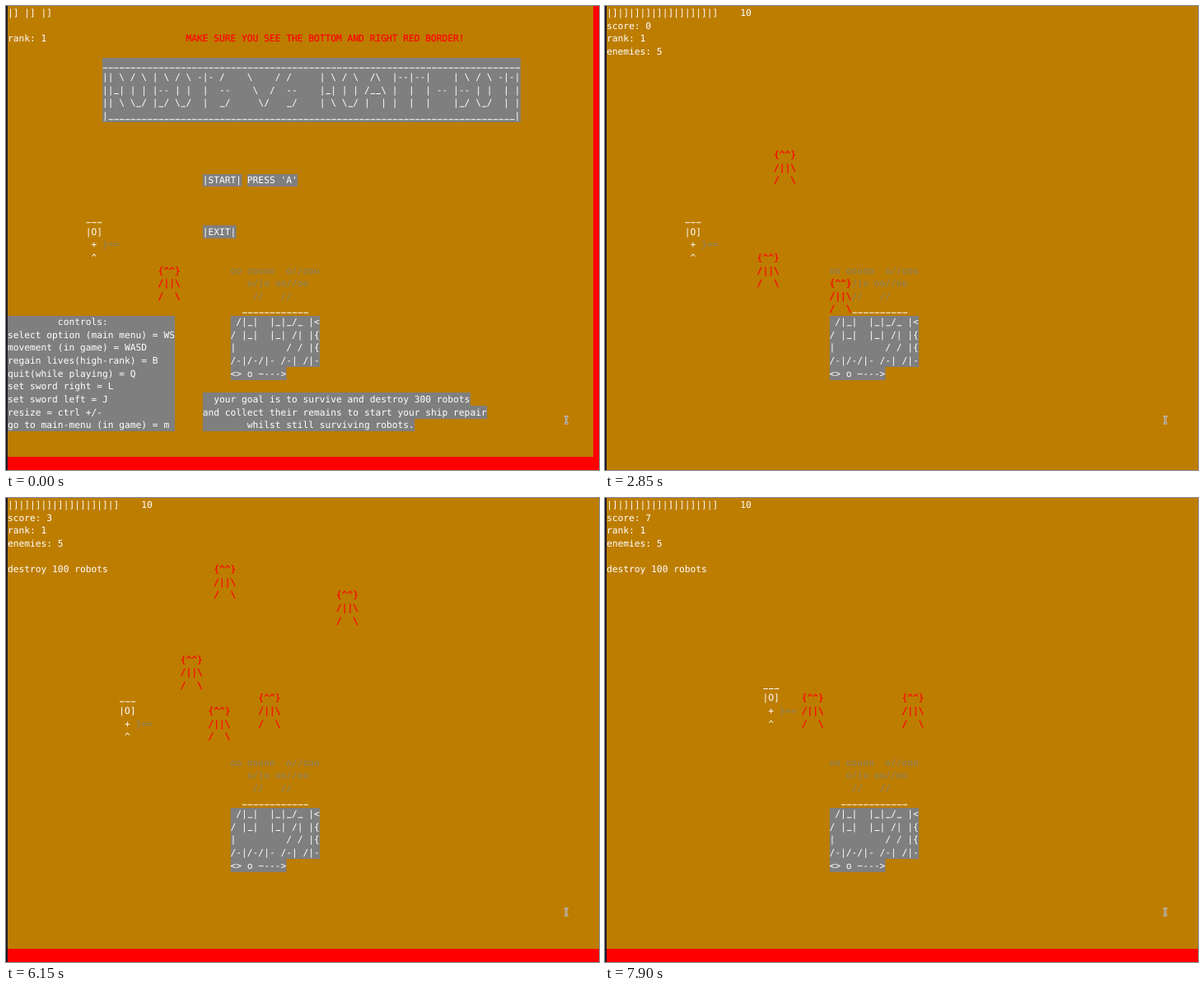
Animation, 720 px wide and 563 px high, one loop 8000 ms. Source, as an HTML page:

```html
<!DOCTYPE html>
<html lang="en">
<head>
<meta charset="utf-8">
<title>Terminal game</title>
<style>
  html, body { margin: 0; width: 100%; height: 100%; overflow: hidden; background: #bd7d00; }
  svg { display: block; width: 100%; height: 100%; }
  text {
    font: 11.245px "DejaVu Sans Mono", "Noto Sans Mono", monospace;
    font-variant-ligatures: none;
    text-rendering: geometricPrecision;
    white-space: pre;
  }
</style>
</head>
<body>
<svg id="stage" viewBox="0 0 720 563">
  <rect width="720" height="563" fill="#bd7d00"/>
  <rect width="2" height="563" fill="#1c1a26"/>
  <g id="panels" fill="#7f7f7f"></g>
  <g id="menuPanels" fill="#7f7f7f"></g>
  <rect id="right" x="713" width="7" height="563" fill="#f00"/>
  <rect id="bottom" x="2" y="547" width="718" height="16" fill="#f00"/>
  <g id="rows"></g>
  <g fill="none">
    <path d="M678 498h4.500M680.300 498v8.500M678 506.500h4.500" stroke="#d6d3cc" stroke-width="2.200"/>
    <path d="M678.500 498h3.500M680.300 498v8.500M678.500 506.500h3.500" stroke="#777" stroke-width=".7"/>
  </g>
</svg>
<script>
const NS = 'http://www.w3.org/2000/svg';
const COLS = 106, ROWS = 36, CW = 6.77, CH = 15.63;
const LOOP = 8000, GAME = 2600, MOVE = 4900, TURN = 1000 / 12;
const $ = id => document.getElementById(id);

function add(parent, tag, attrs) {
  const el = document.createElementNS(NS, tag);
  for (const k in attrs) el.setAttribute(k, attrs[k]);
  return parent.appendChild(el);
}

// Underscores are drawn as short dashes on the baseline.
const styles = {
  white: { fill: '#fff' },
  line: { stroke: '#fff' },
  red: { fill: '#f00', stroke: '#f00', 'stroke-width': 0.2 },
  dim: { fill: '#837f66' }
};
const layers = {};
for (const name in styles) {
  const g = add($('rows'), 'g', styles[name]);
  layers[name] = Array.from({ length: ROWS }, (_, r) => {
    const y = 12 + r * CH;
    return { y, el: add(g, name === 'line' ? 'path' : 'text', { x: 2, y }), cells: [], shown: '' };
  });
}

function put(col, row, lines, color = 'white') {
  [].concat(lines).forEach((line, i) => [...line].forEach((ch, j) => {
    for (const name in layers) layers[name][row + i].cells[col + j] = ' ';
    layers[ch === '_' ? 'line' : color][row + i].cells[col + j] = ch;
  }));
}

function panel(group, col, row, lines) {
  const w = Math.max(...lines.map(s => s.length));
  const edge = r => Math.round(0.5 + r * CH);
  add($(group), 'rect', {
    x: 2 + col * CW, y: edge(row), width: w * CW, height: edge(row + lines.length) - edge(row)
  });
}

const menu = [
  [17, 4, [
    '_'.repeat(75),
    '|| \\ / \\ | \\ / \\ -|- /    \\    / /     | \\ / \\  /\\  |--|--|    | \\ / \\ -|-|',
    '||_| | | |-- | |  |  --    \\  /  --    |_| | | /__\\ |  |  | -- |-- | |  | |',
    '|| \\ \\_/ |_/ \\_/  |  _/     \\/   _/    | \\ \\_/ |  | |  |  |    |_/ \\_/  | |',
    '|' + '_'.repeat(73) + '|'
  ]],
  [35, 13, ['|START|']],
  [43, 13, ["PRESS 'A'"]],
  [35, 17, ['|EXIT|']],
  [0, 24, [
    '         controls:',
    'select option (main menu) = WS',
    'movement (in game) = WASD',
    'regain lives(high-rank) = B',
    'quit(while playing) = Q',
    'set sword right = L',
    'set sword left = J',
    'resize = ctrl +/-',
    'go to main-menu (in game) = m'
  ]],
  [35, 30, ['  your goal is to survive and destroy 300 robots']],
  [35, 31, ['and collect their remains to start your ship repair']],
  [35, 32, ['        whilst still surviving robots.']]
];
const ship = [
  [40, 24, [
    ' /|_|  |_|_/_ |<',
    '/ |_|  |_| /| |{',
    '|         / / |{',
    '/-|/-/|- /-| /|-'
  ]],
  [40, 28, ['<> o ~--->']]
];
menu.forEach(m => panel('menuPanels', ...m));
ship.forEach(s => panel('panels', ...s));

const smoke = ['oo ooooo  o//ooo', '   o/|o oo//oo', '    //   //'];
const body = ['{^^}', '/||\\', '/  \\'];
const blank = Array(3).fill('    ');

// The hero zigzags between a few corners, given by turn.
const corners = [
  { turn: -1, x: 14, y: 16 }, { turn: 0, x: 14, y: 17 }, { turn: 1, x: 14, y: 17 },
  { turn: 10, x: 18, y: 14 }, { turn: 21, x: 22, y: 17 },
  { turn: 30, x: 26, y: 14 }, { turn: 36, x: 28, y: 14 }
];
const SLOW = 0.29, FAST = 0.47;
const robots = [
  { born: -4, x: 27, y: 20, speed: FAST },
  { born: -2, x: 30, y: 11, speed: SLOW },
  { born: -2, x: 40, y: 21, speed: SLOW },
  { born: 11, x: 46, y: 13, speed: FAST },
  { born: 11, x: 38, y: 3, speed: SLOW },
  { born: 11, x: 60, y: 5, speed: SLOW },
  { born: 11, x: 32, y: 10, speed: FAST },
  { born: 22, x: 38, y: 12, speed: FAST }
];
const repaints = [-4, 11, 25];

// Four turns at the start of the game, a pause, then steady play.
function turnAt(t) {
  const turns = from => Math.floor((t - from) / TURN + 1e-6);
  if (t < GAME) return -4;
  return t < MOVE ? Math.min(-1, turns(GAME) - 4) : turns(MOVE);
}

function heroAt(turn) {
  const i = corners.findIndex(c => c.turn >= turn);
  const b = corners[i < 0 ? corners.length - 1 : i], a = corners[Math.max(0, i - 1)];
  const k = i > 0 ? (turn - a.turn) / (b.turn - a.turn) : 1;
  return { x: Math.round(a.x + (b.x - a.x) * k), y: Math.round(a.y + (b.y - a.y) * k) };
}

// Robots drift left, match the hero's row every other turn and die on the sword.
function chase(robot, turn) {
  const trail = [];
  let y = robot.y;
  for (let n = robot.born; n <= turn; n++) {
    const hero = heroAt(n);
    const steps = Math.max(0, n - Math.max(0, robot.born));
    const x = robot.x - Math.floor(robot.speed * steps);
    if (x <= hero.x + 6) return { trail, dead: true };
    if (n > robot.born && n % 2 === 0) y += Math.sign(hero.y + 1 - y);
    trail.push({ n, x, y });
  }
  return { trail, dead: false };
}

function drawMenu() {
  put(0, 0, '|] |] |]');
  put(0, 2, 'rank: 1');
  put(32, 2, 'MAKE SURE YOU SEE THE BOTTOM AND RIGHT RED BORDER!', 'red');
  menu.forEach(m => put(...m));
}

function drawStatus(score) {
  put(0, 0, '|]'.repeat(10) + '    10');
  put(0, 1, ['score: ' + score, 'rank: 1', 'enemies: 5']);
  if (score) put(0, 5, 'destroy 100 robots');
}

function drawShip() {
  put(40, 20, smoke, 'dim');
  put(42, 23, '_'.repeat(12));
  ship.forEach(s => put(...s));
}

// Passing robots wipe the scenery until it is painted again.
function drawRobots(hunts, turn) {
  const since = repaints.filter(n => n <= turn).pop();
  for (const { trail } of hunts)
    for (const p of trail) if (p.n >= since) put(p.x, p.y, blank);
  for (const { trail, dead } of hunts) {
    const p = trail[trail.length - 1];
    if (p && !dead) put(p.x, p.y, body, 'red');
  }
}

function drawHero({ x, y }, half) {
  put(x, y, half ? ['__', '|O'] : ['___', '|O]']);
  put(x + 1, y + 2, ['+', '^']);
  if (!half) put(x + 3, y + 2, '}==', 'dim');
}

function flush() {
  for (const name in layers) for (const row of layers[name]) {
    const s = row.cells.join('').trimEnd();
    if (s === row.shown) continue;
    row.shown = s;
    if (name !== 'line') row.el.textContent = s;
    else row.el.setAttribute('d', [...s].map((ch, i) =>
      ch === '_' ? `M${2.6 + i * CW} ${row.y + 0.7}h5.6` : '').join(''));
  }
}

function render(now) {
  const t = now % LOOP, turn = turnAt(t);
  const inMenu = t < GAME, half = turn >= 0 && t < MOVE + 100;
  const hunts = robots.map(r => chase(r, turn));
  const score = turn < 0 ? 0 : 1 + hunts.filter(h => h.dead).length;

  for (const name in layers) for (const row of layers[name]) row.cells = Array(COLS).fill(' ');
  if (inMenu) drawMenu(); else drawStatus(score);
  drawShip();
  drawRobots(hunts, turn);
  if (half) put(robots[0].x, 21, body[2], 'red');
  drawHero(heroAt(half ? 0 : turn), half);
  flush();

  const show = (id, on) => { $(id).style.display = on ? '' : 'none'; };
  show('menuPanels', inMenu);
  show('right', inMenu);
  show('bottom', inMenu || turn >= repaints[1]);
}

const start = performance.now();
function loop() {
  render(performance.now() - start);
  requestAnimationFrame(loop);
}
loop();
</script>
</body>
</html>
```
